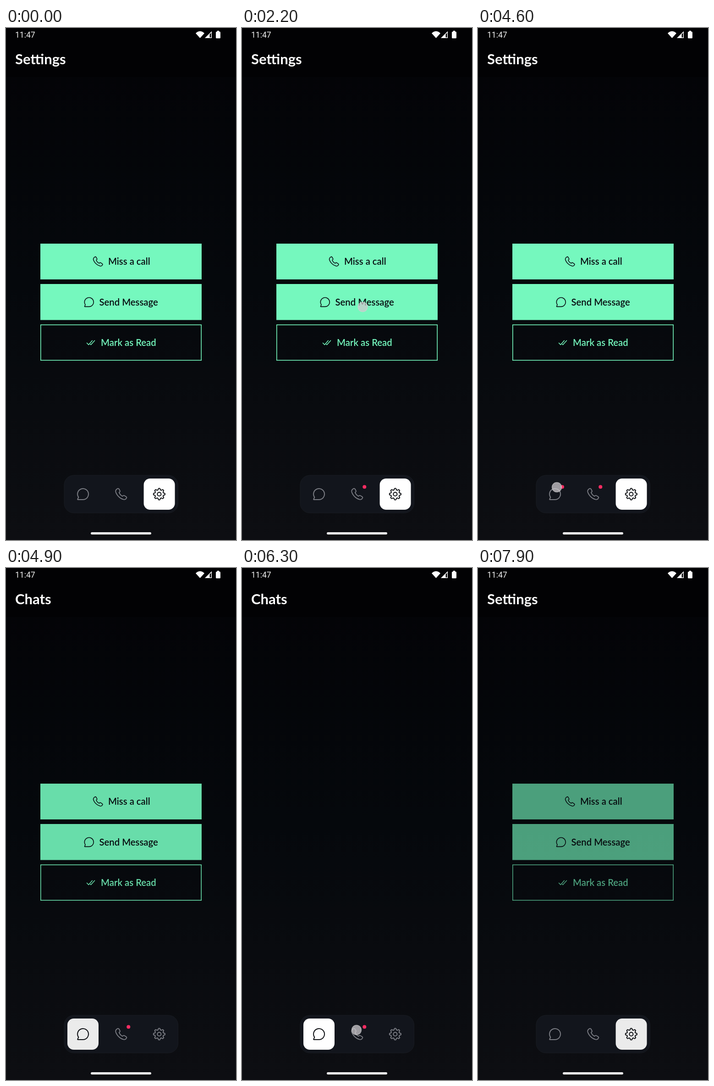
Animation, 502 px wide and 1116 px high, one loop 8000 ms. Source, as an HTML page:

```html
<!DOCTYPE html>
<html lang="en">
<head>
<meta charset="utf-8">
<title>Tab bar badges</title>
<style>
  html, body { margin: 0; width: 100%; height: 100%; overflow: hidden; background: #030407; }
  svg { display: block; width: 100vw; height: 100vh; }
  .title { font: 700 31px Lato, sans-serif; fill: #fff; }
  .label { font: 600 20.3px Lato, sans-serif; }
  .clock { font: 400 17.5px Roboto, sans-serif; fill: #f1f1f1; }
  .icon { fill: none; stroke: currentColor; stroke-linecap: round; stroke-linejoin: round; }
  .dark { fill: #060b0f; color: #060b0f; }
  .tab { color: #7b7d84; }
  .tab.active { color: #0c0e12; }
</style>
</head>
<body>
<svg viewBox="0 0 502 1116" preserveAspectRatio="none">
  <defs>
    <linearGradient id="night" x2="0" y2="1">
      <stop offset="0" stop-color="#030306"/>
      <stop offset=".5" stop-color="#05080c"/>
      <stop offset="1" stop-color="#0d0e12"/>
    </linearGradient>
    <!-- 24-unit icons, centred on the origin -->
    <path id="chat" d="M0 9H-8.3Q-9.1 9-8.7 8.2L-7.3 5.2A9 9 0 1 1 0 9Z"/>
    <path id="phone" transform="translate(-12 -12)" d="M5.2 3.6L6.3 2.9Q7.6 2.3 8.4 3.6L10 6.4Q10.6 7.6 9.6 8.4L8.7 9.2Q9.8 13.2 14.3 15.5L15.4 14.5Q16.3 13.8 17.3 14.4L20.3 16.3Q21.5 17.2 20.8 18.4L20 19.6Q18.6 21.4 16 20.8C9.5 19 4.5 13.5 3 8Q2.6 5.4 5.2 3.6Z"/>
  </defs>

  <rect width="502" height="1116" fill="url(#night)"/>
  <rect width="502" height="107" fill="#020204"/>

  <text class="clock" x="20" y="21">11:47</text>
  <g fill="#fff">
    <path d="M414 11.4Q423.5 2.8 433 11.4L423.5 22Z"/>
    <path d="M449 7V22H434Z"/>
    <path d="M447.6 10.5V20.6H444.6V13.5Z" fill="#020204"/>
    <rect x="458" y="8" width="10" height="14.5" rx="1.5"/>
    <rect x="460.8" y="6" width="4.4" height="3"/>
  </g>
  <text class="title" id="title" x="20" y="79"></text>

  <g id="buttons">
    <g class="dark">
      <rect x="75" y="470" width="352" height="78" fill="#75f8be"/>
      <rect id="press0" x="75" y="470" width="352" height="78" fill="#000"/>
      <use class="icon" href="#phone" stroke-width="1.4" transform="translate(200.7 509) scale(1.12)"/>
      <text class="label" x="223" y="516">Miss a call</text>
      <rect x="75" y="558" width="352" height="78.5" fill="#75f8be"/>
      <rect id="press1" x="75" y="558" width="352" height="78.5" fill="#000"/>
      <use class="icon" href="#chat" stroke-width="1.45" transform="translate(181.2 597.5) scale(1.1)"/>
      <text class="label" x="203.5" y="604.5">Send Message</text>
    </g>
    <g fill="#75f8be" color="#75f8be">
      <rect class="icon" x="75.8" y="647" width="350.4" height="77.3" stroke-width="1.6" style="stroke-linejoin:miter"/>
      <path class="icon" stroke-width="1.6" d="M176.5 686.5L180.3 690.5L188.3 681.3M184 689.3L185.2 690.5L193.5 681.3"/>
      <text class="label" x="207" y="692.7">Mark as Read</text>
    </g>
  </g>

  <rect x="127" y="975" width="248.5" height="82" rx="21" fill="#12151c" stroke="#191c22"/>
  <rect id="pill" y="982" width="68" height="68" rx="14"/>
  <use class="icon tab" href="#chat" stroke-width="1.5" transform="translate(168 1016) scale(1.33)"/>
  <use class="icon tab" href="#phone" stroke-width="1.4" transform="translate(251.3 1016) scale(1.33)"/>
  <g class="icon tab" stroke-width="2" transform="translate(334.4 1016)">
    <path id="gear"/><circle r="4.1"/>
  </g>
  <circle class="badge" cx="184" cy="1000.3" r="4" fill="#f92c62"/>
  <circle class="badge" cx="267.3" cy="1000.3" r="4" fill="#f92c62"/>
  <rect x="185" y="1099" width="132" height="5" rx="2.5" fill="#f3f3f3"/>
  <circle id="touch" r="10.5" fill="#cdcace" fill-opacity=".75" stroke="#d2d2d2" stroke-opacity=".6" stroke-width="1.4"/>
</svg>
<script>
const LOOP = 8000, STEP = 100;
const TITLES = ['Chats', 'Calls', 'Settings'];
const TAPS = [
  { at: 500, x: 260, y: 518, button: 0 },
  { at: 2200, x: 263.5, y: 608, button: 1 },
  { at: 4600, x: 172, y: 1001, tab: 0 },
  { at: 6300, x: 250, y: 1007, tab: 1 },
  { at: 7500, x: 329, y: 1023, tab: 2 },
];
const $ = id => document.getElementById(id);
const tabs = [...document.querySelectorAll('.tab')];
const badges = [...document.querySelectorAll('.badge')];
const clamp = v => Math.max(0, Math.min(1, v));
const within = (t, from, to) => t >= from && t < to;

function gearPath() {
  const points = Array.from({ length: 128 }, (_, i) => {
    const a = i / 128 * Math.PI * 2;
    const r = 11 + 1.6 * Math.tanh(1.8 * Math.cos(8 * a)) / Math.tanh(1.8);
    return `${(r * Math.cos(a)).toFixed(2)} ${(r * Math.sin(a)).toFixed(2)}`;
  });
  return `M${points.join('L')}Z`;
}

// Ripple strength by time since the tap
function ripple(age, start) {
  return age < start ? 0 : 0.08 * clamp((800 - age) / 200);
}

function draw(t) {
  const tap = TAPS.findLast(p => t >= p.at);
  const age = tap ? t - tap.at : Infinity;
  const selected = TAPS.findLast(p => p.tab !== undefined && t >= p.at + 200);
  const active = selected ? selected.tab : 2;

  $('title').textContent = TITLES[active];
  $('buttons').setAttribute('opacity',
    t < 7500 ? 1 - clamp((t - 4867) / 300) : clamp((t - 7711) / 300));

  const shade = selected ? ripple(t - selected.at, 200) : 0;
  const level = Math.round(255 * (1 - shade));
  $('pill').setAttribute('x', 134 + active * 83.3);
  $('pill').setAttribute('fill', `rgb(${level},${level},${level})`);
  tabs.forEach((tab, i) => tab.classList.toggle('active', i === active));

  [0, 1].forEach(i =>
    $('press' + i).setAttribute('opacity', tap?.button === i ? ripple(age, 100) : 0));

  badges[0].setAttribute('opacity', +within(t, 2500, 4800));
  badges[1].setAttribute('opacity', +within(t, 800, 6500));

  const touch = $('touch');
  touch.setAttribute('opacity', age < 200 ? 1 : age < 300 ? 0.45 : 0);
  if (tap) touch.setAttribute('transform', `translate(${tap.x} ${tap.y})`);
}

$('gear').setAttribute('d', gearPath());
const start = performance.now();
function tick() {
  const t = (performance.now() - start) % LOOP;
  draw(Math.floor(t / STEP) * STEP);
  requestAnimationFrame(tick);
}
tick();
</script>
</body>
</html>
```
